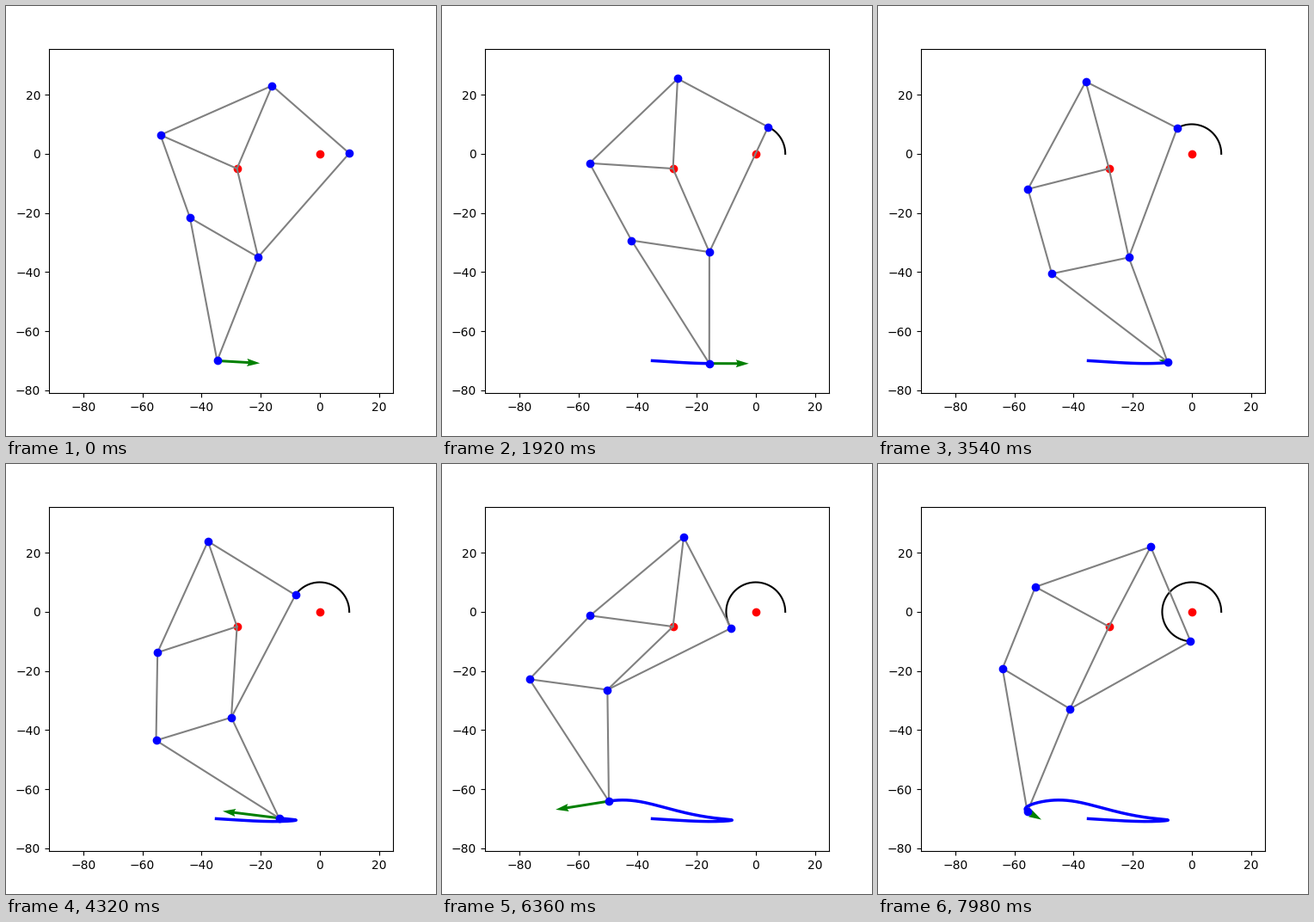
A matplotlib script for the animation above (8000 ms loop, 500 by 500 pixels).

```python
import numpy as np
import matplotlib.pyplot as plt
from matplotlib.animation import FuncAnimation

FRAMES = 267
LOOP_MS = 8000
CENTRE, PIVOT = 0 + 0j, -28 - 5j

# Joints of the leg with the crank at angle zero
CRANK0 = 10 + 0j
TOP0 = -16 + 23j
KNEE0 = -21 - 35j
REAR0 = -53.85 + 6.47j
HEEL0 = -44 - 21.6j
FOOT0 = -35 - 70j


def side(a, b, c):
    """Side of the line a-b on which c lies."""
    return np.sign(((b - a).conjugate() * (c - a)).imag)


def join(p, q, p0, q0, x0):
    """Joint tied to p and q by the rods it has in the start pose."""
    rp, rq = abs(x0 - p0), abs(x0 - q0)
    d = np.abs(q - p)
    along = (rp**2 - rq**2 + d**2) / (2 * d)
    off = np.sqrt(rp**2 - along**2) * side(p0, q0, x0)
    return p + (along + 1j * off) * (q - p) / d


# Whole turn of the mechanism, positions as complex numbers
theta = np.linspace(0, 2 * np.pi, 360)
crank = 10 * np.exp(1j * theta)
pivot = np.full_like(crank, PIVOT)
top = join(crank, pivot, CRANK0, PIVOT, TOP0)
knee = join(crank, pivot, CRANK0, PIVOT, KNEE0)
rear = join(top, pivot, TOP0, PIVOT, REAR0)
heel = join(rear, knee, REAR0, KNEE0, HEEL0)
foot = join(heel, knee, HEEL0, KNEE0, FOOT0)
speed = np.gradient(foot)

rods = [(crank, top), (top, pivot), (top, rear), (rear, pivot),
        (rear, heel), (pivot, knee), (heel, knee), (crank, knee),
        (heel, foot), (knee, foot)]
joints = np.array([crank, top, rear, knee, heel, foot])

fig = plt.figure(figsize=(5, 5), dpi=100)
ax = fig.add_axes([0.1, 0.1, 0.8, 0.8])
ax.set_xlim(-91.6, 24.79)
ax.set_ylim(-80.93, 35.46)

fixed = np.array([CENTRE, PIVOT])
ax.plot(fixed.real, fixed.imag, "o", color="red")
arc, = ax.plot([], [], color="black")
bars = [ax.plot([], [], color="gray")[0] for _ in rods]
trail, = ax.plot([], [], color="blue", lw=2.5)
dots, = ax.plot([], [], "o", color="blue")
arrow = ax.quiver([FOOT0.real], [FOOT0.imag], [1], [0], color="green",
                  angles="xy", scale_units="xy", scale=0.02)


def place(line, z):
    line.set_data(z.real, z.imag)


def update(frame):
    k = frame + 1
    place(arc, crank[:k + 1])
    place(trail, foot[:k + 1])
    place(dots, joints[:, k])
    for bar, (a, b) in zip(bars, rods):
        place(bar, np.array([a[k], b[k]]))
    arrow.set_offsets([[foot[k].real, foot[k].imag]])
    arrow.set_UVC([speed[k].real], [speed[k].imag])
    return [arc, trail, dots, arrow, *bars]


anim = FuncAnimation(fig, update, frames=FRAMES, init_func=lambda: update(0),
                     interval=LOOP_MS / FRAMES, repeat=True, repeat_delay=0)
plt.show()
```
